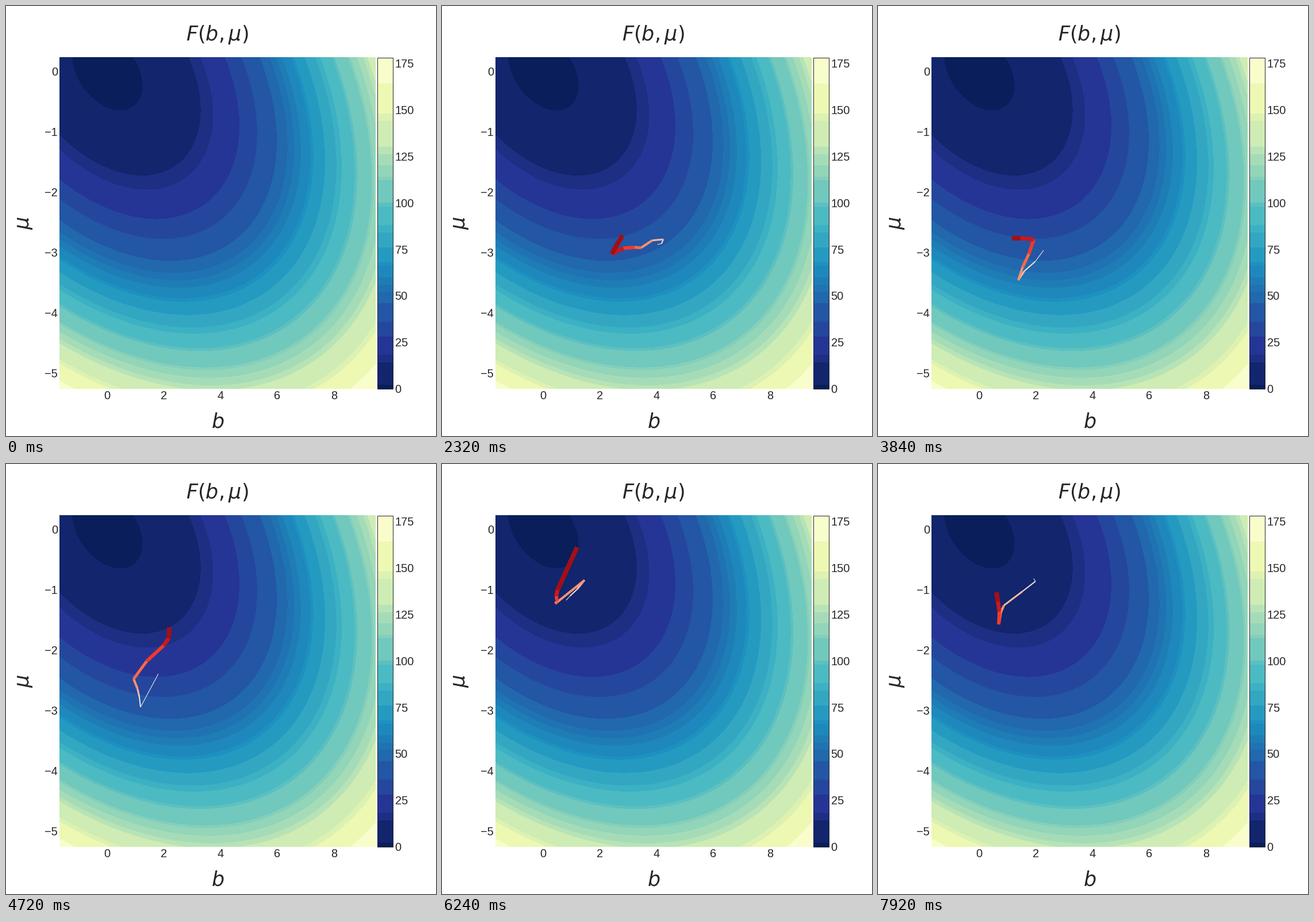
Recreate the animation shown at these times as a matplotlib script. Size 748 px wide and 748 px high, loop 8 s.

```python
import numpy as np
import matplotlib.pyplot as plt
from matplotlib.animation import FuncAnimation
from matplotlib.collections import LineCollection
from matplotlib.patches import Rectangle

SIZE, DPI = 748, 100
PT = 72 / DPI                     # points per pixel
FRAMES, INTERVAL = 100, 80
TRAIL = 8
INK = "0.15"
LEFT, RIGHT = 0.125 * SIZE, 642.2
TOP, BOTTOM = 0.12 * SIZE, 0.89 * SIZE
BAR_X, BAR_W, PAD = 645.8, 27.4, 3.5
LEVELS = [0, 2, 14, 18, 28, 36, 46, 52, 56, 60, 66, 68, 76, 84, 88, 98,
          100, 112, 114, 120, 126, 130, 144, 148, 164, 178]

# Turning points of the descent: step, x, y
TURNS = [(0, 525, 471), (5, 455, 504), (7, 386, 560), (10, 382, 515),
         (13, 335, 522), (19, 375, 415), (21, 385, 406), (26, 295, 431),
         (27, 314, 399), (32, 278, 333), (38, 288, 425), (41, 244, 477),
         (44, 271, 406), (46, 233, 404), (49, 265, 365), (50, 234, 423),
         (53, 222, 374), (55, 274, 316), (57, 284, 284), (65, 209, 262),
         (68, 216, 237), (71, 248, 202), (72, 197, 243), (75, 201, 219),
         (76, 235, 145), (80, 191, 158), (90, 274, 204), (92, 219, 246),
         (94, 210, 279), (97, 206, 223)]


def descent():
    """Walk from turn to turn, with seeded noise on the steps between."""
    step, *spots = np.array(TURNS).T
    every = np.arange(step[-1] + 1)
    path = np.column_stack([np.interp(every, step, s) for s in spots])
    noise = np.random.default_rng(4).uniform(-5, 5, path.shape)
    noise[step] = 0
    return path + noise


def to_x(b):
    return 176.2 + 49.3 * b


def to_y(mu):
    return 113 - 105.1 * mu


def bar_y(value):
    return BOTTOM - value * (BOTTOM - TOP) / LEVELS[-1]


def loss(b, mu):
    return 1.487 * b**2 + 2.097 * b * mu + 5.384 * mu**2


def label(x, y, text, size=20, ha="center", va="center_baseline", **kw):
    ax.text(x, y, text, fontsize=size * PT, ha=ha, va=va, color=INK, **kw)


plt.rcParams["font.family"] = "Liberation Sans"
plt.rcParams["mathtext.fontset"] = "dejavusans"

fig = plt.figure(figsize=(SIZE / DPI, SIZE / DPI), dpi=DPI, facecolor="white")
ax = fig.add_axes([0, 0, 1, 1])
ax.axis("off")

# Contour field
cmap, norm = plt.get_cmap("YlGnBu_r"), plt.Normalize(0, LEVELS[-1])
b, mu = np.meshgrid(np.linspace(-1.678, 9.452, 300), np.linspace(0.221, -5.259, 300))
field = np.clip(loss(b, mu), 0.001, LEVELS[-1] - 0.001)
ax.contourf(np.linspace(LEFT, RIGHT, 300), np.linspace(TOP, BOTTOM, 300), field,
            LEVELS, cmap=cmap, norm=norm)

# Colour bar
for lo, hi in zip(LEVELS, LEVELS[1:]):
    ax.add_patch(Rectangle((BAR_X, bar_y(hi)), BAR_W, bar_y(lo) - bar_y(hi),
                           color=cmap(norm((lo + hi) / 2)), lw=0, antialiased=False))
ax.add_patch(Rectangle((BAR_X, TOP), BAR_W, BOTTOM - TOP, fill=False, ec=INK, lw=PT))

# Labels
for v in range(0, 176, 25):
    label(BAR_X + BAR_W + PAD, bar_y(v), str(v), ha="left")
for v in range(0, 9, 2):
    label(to_x(v), BOTTOM + PAD, str(v), va="top")
for v in range(0, -6, -1):
    label(LEFT - PAD, to_y(v), str(v).replace("-", "\u2212"), ha="right")
middle = (LEFT + RIGHT) / 2
label(middle, 60, r"$F(b, \mu)$", 35, va="baseline")
label(middle, 734, "$b$", 35, va="baseline")
label(40, (TOP + BOTTOM) / 2, r"$\mu$", 35, va="baseline",
      rotation=90, rotation_mode="anchor")

path = descent()
trail = LineCollection([], capstyle="butt", zorder=5)
ax.add_collection(trail, autolim=False)
ax.set_xlim(0, SIZE)
ax.set_ylim(SIZE, 0)

rank = np.arange(TRAIL)
shades = plt.get_cmap("Reds")(rank / TRAIL)
widths = (rank + 1) * PT


def draw(frame):
    head = max(frame - 2, 0)
    pts = path[max(head - TRAIL, 0):head + 1]
    n = len(pts) - 1
    trail.set_segments([pts[i:i + 2] for i in range(n)])
    trail.set_color(shades[TRAIL - n:])
    trail.set_linewidth(widths[TRAIL - n:] if n else [1])
    return [trail]


anim = FuncAnimation(fig, draw, frames=FRAMES, interval=INTERVAL,
                     init_func=lambda: draw(0), repeat=True, repeat_delay=0)
plt.show()
```
